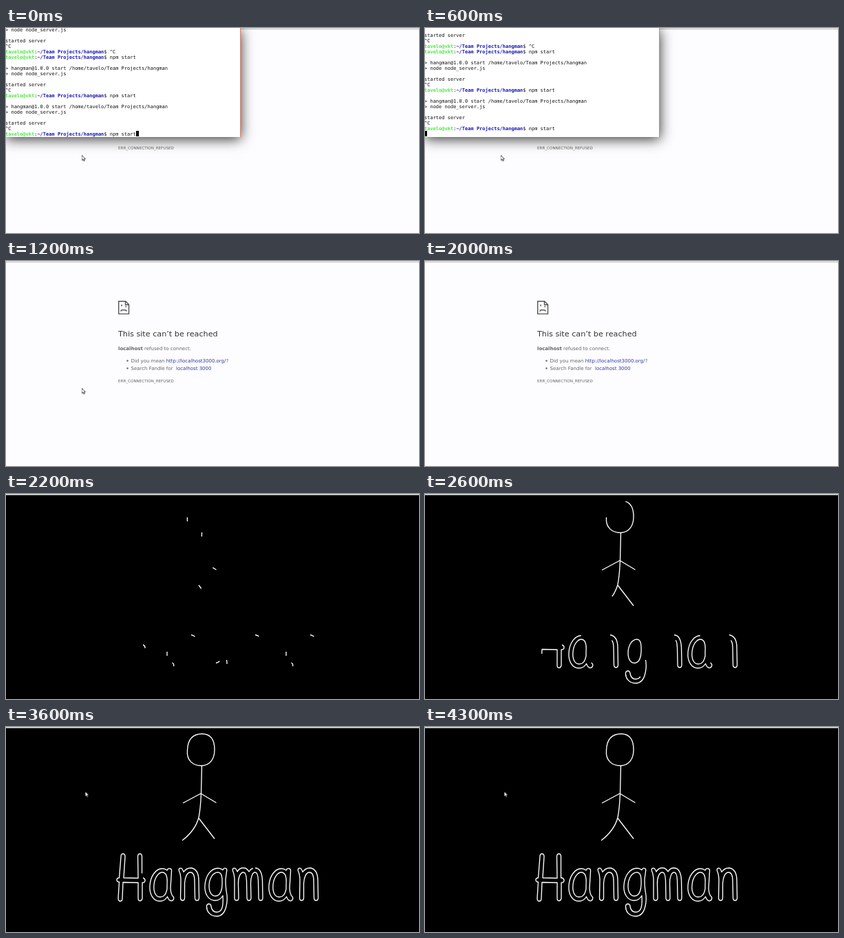
An HTML page that plays this animation: 600x299 px, repeating every 5000 ms.

```html
<!DOCTYPE html>
<html lang="en">
<head>
<meta charset="utf-8">
<title>Hangman</title>
<style>
  html, body { margin: 0; width: 100%; height: 100%; overflow: hidden; background: #fdfcfe; }
  #stage { position: relative; width: 600px; height: 299px; overflow: hidden; }
  #stage > * { position: absolute; left: 0; top: 0; }
  svg { width: 600px; height: 299px; }
  text { font-family: "DejaVu Sans", sans-serif; }

  .anim { animation: 5s step-end -4ms infinite; }

  /* Error page */
  .body { font-size: 7px; fill: #646464; }
  .link { fill: #2b3ba6; }

  /* Terminal */
  #term {
    width: 340px; height: 159px; background: #fff;
    border-right: 1px solid #dc8468;
    box-shadow: 0 3px 18px rgba(0, 0, 0, .8);
    animation-name: term;
  }
  #view { position: absolute; inset: 0; overflow: hidden; }
  #log {
    position: absolute; left: -1px; top: -1.5px; margin: 0; color: #111;
    font: 7px/8px "DejaVu Sans Mono", monospace;
    animation-name: scroll;
  }
  #log b { color: #1616b8; }
  #log .user { color: #4ce83e; }
  #caret {
    position: absolute; left: 0; top: 150px; width: 4px; height: 8px;
    box-sizing: border-box; border: 1px solid #000; background: #000;
    animation-name: caret;
  }
  @keyframes term { 0% { visibility: visible } 22%, 100% { visibility: hidden } }
  @keyframes scroll {
    0% { transform: none }
    4% { transform: translateY(-8px) }
    14% { transform: translateY(-40px) }
    16%, 100% { transform: translateY(-48px) }
  }
  @keyframes caret {
    0% { transform: translateX(189px); background: #000 }
    4% { transform: translateX(-1px); background: #000 }
    18%, 100% { transform: translateX(-1px); background: #fff }
  }

  /* Window switcher */
  #switcher { animation-name: switcher; }
  @keyframes switcher {
    0% { opacity: 0 }
    18% { opacity: 1 }
    22% { opacity: .5 }
    24%, 100% { opacity: 0 }
  }

  /* Game: every outline is drawn at the same speed */
  #game { animation-name: game; }
  #lines {
    fill: none; stroke: #fff; stroke-width: 1.35; stroke-linecap: butt; stroke-linejoin: round;
    stroke-dasharray: 364 400;
    animation-name: draw;
  }
  @keyframes game { 0% { visibility: hidden } 44%, 100% { visibility: visible } }
  @keyframes draw {
    0% { stroke-dashoffset: 358 }
    44% { stroke-dashoffset: 358; animation-timing-function: steps(16) }
    76%, 100% { stroke-dashoffset: 0 }
  }

  #mouse { animation-name: mouse; }
  @keyframes mouse {
    0% { transform: translate(109.5px, 185px) }
    24% { transform: translate(109.5px, 185px); animation-timing-function: steps(5) }
    34% { transform: translate(47px, 8px) }
    36% { transform: translate(50px, -20px) }
    58% { transform: translate(56px, -6px) }
    60% { transform: translate(56px, 1px) }
    62% { transform: translate(56px, 2px) }
    64% { transform: translate(88px, 50px) }
    66% { transform: translate(114px, 92px) }
    68%, 100% { transform: translate(114.5px, 93.5px) }
  }
</style>
</head>
<body>
<div id="stage">
  <svg id="page">
    <rect width="600" height="299" fill="#fdfcfe"/>
    <rect width="600" height="1" fill="#f1f1f1"/>
    <rect y="1" width="600" height="1" fill="#bababc"/>
    <g fill="none" stroke="#535353" stroke-width="1.4">
      <path d="M163.7 58.7h10l4.8 4.8v13.6h-14.8zM173.5 58.7v5h5"/>
      <path d="M168 63.5v2.5M174.3 65.5v2M167 73.5q0-2 2-2h4q2 0 2 2"/>
    </g>
    <text x="163" y="110" font-size="11.2" fill="#333">This site can’t be reached</text>
    <g class="body">
      <text x="163" y="129.5"><tspan font-weight="bold">localhost</tspan> refused to connect.</text>
      <circle cx="176.5" cy="145.5" r="1.2"/>
      <text x="181.5" y="147.8">Did you mean <tspan class="link">http://localhost3000.org/</tspan>?</text>
      <circle cx="176.5" cy="156.5" r="1.2"/>
      <text x="181.5" y="158.8">Search Fandle for <tspan class="link" x="247">localhost 3000</tspan></text>
      <text x="163" y="176.7" font-size="5.6">ERR_CONNECTION_REFUSED</text>
    </g>
  </svg>

  <div id="term" class="anim">
    <div id="view">
      <pre id="log" class="anim"></pre>
      <div id="caret" class="anim"></div>
    </div>
  </div>

  <svg id="switcher" class="anim">
    <rect x="49" y="73" width="478" height="105.5" rx="2" fill="#8b9c8e" fill-opacity=".62"
          stroke="#d3d8d4" stroke-opacity=".85" stroke-width="3"/>
    <rect x="76" y="87" width="70" height="70" rx="6" fill="#c4959a" fill-opacity=".85"/>
    <rect x="165" y="87" width="69" height="70" rx="6" fill="#d4d6d4"/>
    <rect x="174" y="104" width="50" height="41" fill="#6b6e6b" stroke="#f0f0f0" stroke-width="2"/>
    <path d="M180 113l8 6-8 6M191 127h11" fill="none" stroke="#fff" stroke-width="2.4"/>
    <rect x="248" y="83" width="81" height="76" rx="9" fill="#f0f2f0" fill-opacity=".8"/>
    <circle cx="288" cy="122" r="27.5" fill="#d9786c"/>
    <rect x="344" y="87" width="69" height="70" rx="6" fill="#a5c9ad"/>
    <circle cx="378.5" cy="122" r="29" fill="#7fcf8c"/>
    <rect x="432" y="87" width="69" height="70" rx="6" fill="#a6bfae"/>
    <circle cx="466.5" cy="122" r="29" fill="#626b68"/>
    <text x="288.5" y="170" font-size="5.3" font-weight="bold" fill="#fff" text-anchor="middle">Fandle Copper</text>
  </svg>

  <svg id="game" class="anim">
    <rect width="600" height="2" fill="#e4e6e6"/>
    <rect y="1.6" width="600" height="298" fill="#000"/>
    <g id="lines" class="anim">
      <!-- figure -->
      <path d="M263.5 34C262 49 272 56.5 284 56.5C297 56 303 46 303 33C303 18 297 10 285 10C270 10 264 19 263.5 34"/>
      <path d="M284.5 56L283.5 97Q282.5 120 280 132Q275 151 256 165.5"/>
      <path d="M305.5 110.5L283 97L257 111"/>
      <path d="M280 133L303 163"/>
      <!-- H -->
      <path d="M199 220q3 1 3 4q0 3-4 3L198 250q-1 3.5-3 3.5q-3 0-3-3.5L192 227L170 226.5L169 250q0 4-3 4q-3 0-3-4L164.5 226q-3.5 0-3.5-3q0-3 3.5-3L167 189q0-4 3-4q3 0 3 4L171 220L192 220.5L191.5 189q0-4 3-4q3 0 3 4L197.5 220z"/>
      <!-- a, n -->
      <g id="an">
        <path d="M241.5 246q3 2 2 5q-1 3-4 2.5q-3-.5-5-6q-4 6.5-11 6.5C214 254 208 244 209 231C210 217 218 206.5 227 206.5q4 0 7 2.5q1-3 4-2.5q3 .5 2.5 4L239 235q0 6 2.5 11"/>
        <path d="M234 230L234 236q-2 12-10 12C217 248 214 240 215 230C216 219 222 212 227 212C232 212 235 217 234 230"/>
        <path d="M269 205.5C277 207 280 214 280 224L280.5 249q0 4-3 4q-3 0-3-4L274 225C274 216 272 212 268 212C263 212 260 219 259.5 228L259.5 249q0 4-3 4q-3 0-3-4L254 222Q253.5 214 251.5 210q-1-3.5 1.5-4q3-1 5 5.5Q262 205.5 269 205.5"/>
      </g>
      <use href="#an" x="173"/>
      <!-- g -->
      <path d="M320.5 242C322 250 322 276 306 276C296 276 291 268 291.5 261q.5-3 3.5-3q3 .5 3 4C299 267 302 270 306 270C314 270 316 262 315 246Q311 253 304 253C294 253 288 243 289 231C290 216 298 206 308 206q4 0 7 2.5q1-3 3.5-2.5q3 0 2 5L319 222Q319 234 320.5 242"/>
      <path d="M305 246.5Q308 246 310 244C314 239 314.5 230 314 222Q313.5 212 308 212C300 212 295 222 295 232C295 241 299 247 305 246.5"/>
      <!-- m -->
      <path d="M362 205.5C369 206 372 213 372.5 224L373 249q0 4-3 4q-3 0-3-4L366.5 224Q366 212 362 212C358 212 355.5 219 355.5 228L356 249q0 4-3 4q-3 0-3-4L349.5 224Q349 212 345 212C340 212 337 220 337.5 230L338 249q0 4-3 4q-3 0-3-4L332 222Q331.5 214 329.5 210q-1-3.5 1.5-4q3-1 5 5Q339 205.5 345 205.5Q350 205.5 353 211Q356 205.5 362 205.5"/>
    </g>
  </svg>

  <svg id="mouse" class="anim">
    <path d="M.5 .5v7.6l1.8-1.6 1.2 2.6 1.3-.6-1.2-2.5h2.3z" fill="#fff" stroke="#111" stroke-width=".8"/>
  </svg>
</div>
<script>
  const prompt = cmd =>
    `<b class="user">tavelo@vkt</b>:<b>~/Team Projects/hangman</b>$ ${cmd}`;
  const run = [
    "",
    "&gt; hangman@1.0.0 start /home/tavelo/Team Projects/hangman",
    "&gt; node node_server.js",
    "",
    "started server",
  ];
  const start = prompt("npm start");
  document.getElementById("log").innerHTML = [
    ...run.slice(2), "^C", prompt("^C"),
    start, ...run, "^C",
    start, ...run, "^C",
    start, ...run,
  ].join("\n");
</script>
</body>
</html>
```
